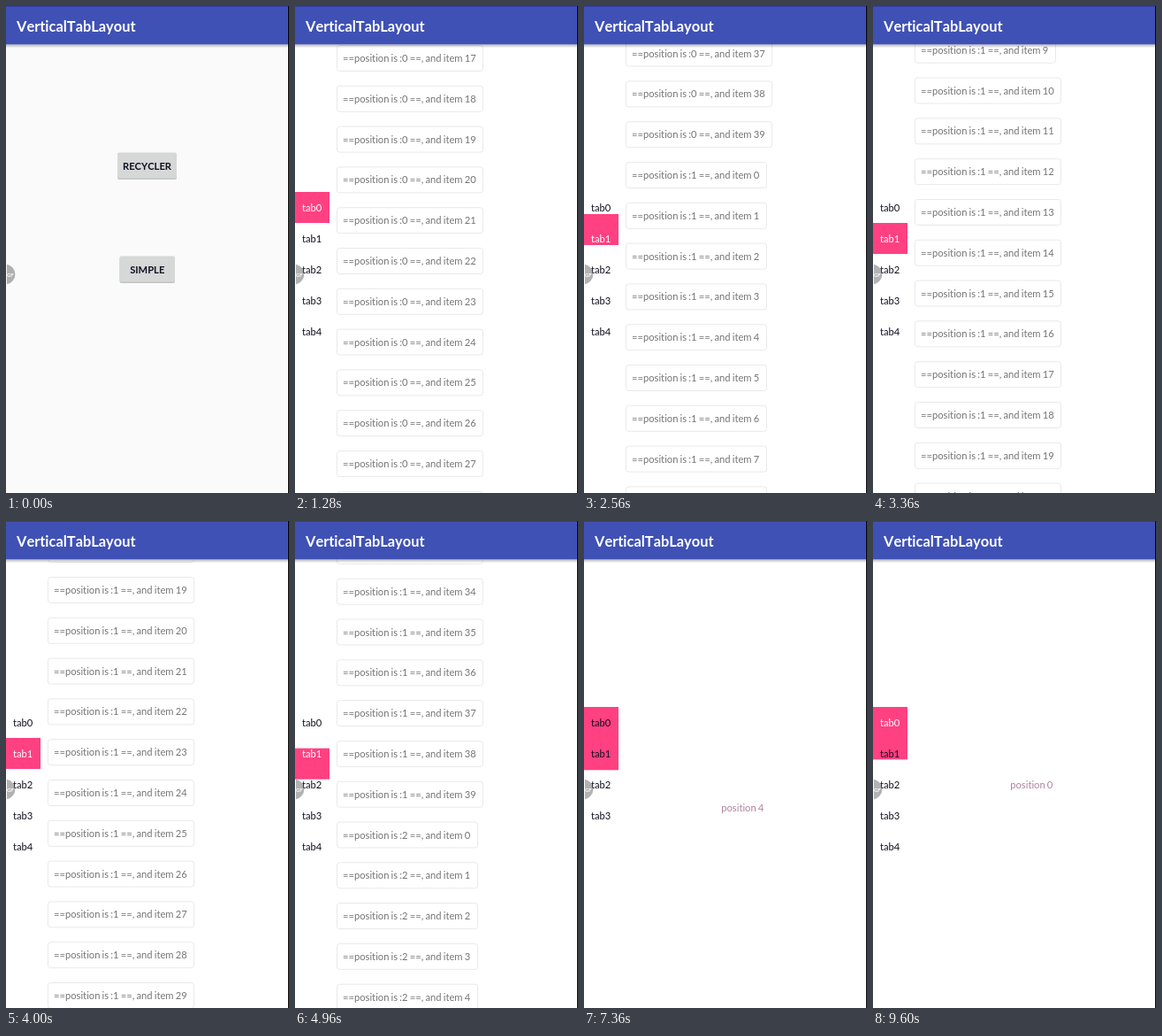
Recreate the animation shown at these times as an HTML page. Size 320 by 550 pixels, loop 9760 ms.

```html
<!DOCTYPE html>
<html lang="en">
<head>
<meta charset="utf-8">
<title>VerticalTabLayout</title>
<style>
  html, body { margin: 0; width: 100%; height: 100%; overflow: hidden; background: #fff; }
  svg { display: block; width: 100%; height: 100%; }
  text {
    font: 11.2px Lato, "Noto Sans", sans-serif;
    font-kerning: none;
    font-variant-ligatures: none;
    word-spacing: -.06em;
  }
  .title { font-size: 16.4px; font-weight: 700; fill: #fff; }
  .button { font-weight: 700; fill: #10101f; text-anchor: middle; }
  .item { fill: #757575; }
  .page { fill: #b0829a; text-anchor: middle; }
  .bubble { font-size: 6px; font-weight: 700; fill: #fff; }
</style>
</head>
<body>
<svg viewBox="0 0 320 550">
  <defs>
    <linearGradient id="shade" x2="0" y2="1">
      <stop stop-color="#000" stop-opacity=".28"/>
      <stop offset="1" stop-color="#000" stop-opacity="0"/>
    </linearGradient>
  </defs>
  <g id="stage"></g>
  <path d="M1 291.7A11.5 11.5 0 0 1 1 314.3Z" fill="#555" opacity=".45"/>
  <text class="bubble" x="1" y="305.5">GF</text>
  <rect x="319" width="1" height="550" fill="#000"/>
</svg>
<script>
const LOOP = 9760, STEP = 160;
const PITCH = 45.8, PER_TAB = 40, FIRST_Y = 69;
const TAB_TOP = 210, TAB_H = 35, HEADER_H = 43.4;
const LEAVING_SHIFT = 1.4;

// time, scroll offset, speed in px/ms
const SCROLL = [
  [560, 0, .6], [1280, 788.6, .9], [2560, 1710, .7], [4000, 2693.2, .66], [5600, 3665.4, .2]
];
// time, selected tab
const TAPS = [[6560, 0], [7326, 4], [7990, 1], [8760, 3], [9432, 0]];

const clamp = v => Math.max(0, Math.min(1, v));
const lerp = (a, b, u) => a + (b - a) * u;
const ease = u => (1 - Math.cos(Math.PI * clamp(u))) / 2;
const tabY = i => TAB_TOP + TAB_H * i;

const rect = (x, y, w, h, fill, more = '') =>
  `<rect x="${x}" y="${y}" width="${w}" height="${h}" fill="${fill}" ${more}/>`;
const label = (cls, x, y, str, more = '') =>
  `<text class="${cls}" x="${x}" y="${y}" ${more}>${str}</text>`;

function scrollAt(t) {
  if (t <= SCROLL[0][0]) return 0;
  const i = SCROLL.findIndex(k => t < k[0]);
  if (i < 0) return SCROLL[SCROLL.length - 1][1];
  const [t0, a, va] = SCROLL[i - 1], [t1, b, vb] = SCROLL[i];
  const d = t1 - t0, u = (t - t0) / d, w = 1 - u;
  return a * (1 + 2 * u) * w * w + va * d * u * w * w
       + b * u * u * (3 - 2 * u) - vb * d * u * u * w;
}

function header() {
  return rect(0, HEADER_H, 320, 4, 'url(#shade)') + rect(0, 0, 320, HEADER_H, '#3f51b5') +
    rect(0, -2, 320, 3, '#303f9f') + label('title', 12, 28.5, 'VerticalTabLayout');
}

function tabs(top, bottom, selected) {
  let out = rect(0, top, 39, bottom - top, '#ff4081');
  for (let i = 0; i < 5; i++)
    out += label('tab', 8, tabY(i) + 21.5, 'tab' + i, `fill="${i === selected ? '#fff' : '#10101f'}"`);
  return out;
}

function button(x, y, w, str, pressed) {
  return rect(x, y + 1, w, 29.5, '#000', 'rx="2" opacity=".22"') +
    rect(x, y, w, 29, pressed ? '#c2c3c3' : '#d6d7d7', 'rx="2"') +
    label('button', x + w / 2, y + 19, str);
}

function home(pressed) {
  return rect(0, 0, 320, 550, '#fafafa') + header() +
    button(126, 165.5, 67, 'RECYCLER', pressed === 'RECYCLER') +
    button(128.5, 282.5, 62.5, 'SIMPLE', pressed === 'SIMPLE');
}

function recycler(t) {
  const offset = scrollAt(t), rowY = n => FIRST_Y + n * PITCH - offset;
  const first = Math.max(0, Math.floor(offset / PITCH) - 1);
  let out = '';
  for (let n = first; n < first + 14; n++) {
    const y = rowY(n), item = n % PER_TAB;
    out += rect(47.5, y - 14.5, item > 9 ? 165 : 159, 29, '#fff', 'rx="3" stroke="#e9e9e9"') +
      label('item', 54, y + 4, `==position is :${Math.floor(n / PER_TAB)} ==, and item ${item}`);
  }
  const pos = [1, 2].reduce((sum, k) => sum + clamp((498 - rowY(k * PER_TAB)) / 430), 0);
  return out + header() + tabs(tabY(pos), tabY(pos + 1), Math.round(pos));
}

function simple(t) {
  let i = TAPS.length - 1;
  while (i > 0 && TAPS[i][0] > t) i--;
  const [start, to] = TAPS[i], from = i ? TAPS[i - 1][1] : to;
  const dir = Math.sign(to - from), dt = t - start;
  // the leading edge moves first, the trailing edge follows
  const lead = lerp(from, to, ease(dt / 100)), trail = lerp(from, to, ease(dt / 100 - 1));
  const slide = dir * 34 * (1 - clamp(dt / 160));
  return label('page', 179.3, 301.5 + slide, 'position ' + to) + header() +
    tabs(tabY(Math.min(lead, trail)), tabY(Math.max(lead, trail) + 1), to);
}

function screen(content, dy, opacity = 1) {
  return `<g transform="translate(0 ${dy})" opacity="${opacity}">` +
    rect(0, -2, 320, 560, '#fff') + content + '</g>';
}

function scene(t) {
  if (t < 320) return home();
  if (t < 480) return home('RECYCLER');
  if (t < 640) return home() + screen(recycler(0), 5, .85);
  if (t < 6080) return screen(recycler(t), t >= 5920 ? LEAVING_SHIFT : 0);
  if (t < 6560) return home();
  if (t < 6720) return home('SIMPLE');
  if (t < 6880) return home() + screen(simple(t), 5, .85);
  return screen(simple(t), 0);
}

const stage = document.getElementById('stage');
let shown = -1;
function draw() {
  const t = Math.floor(performance.now() % LOOP / STEP) * STEP;
  if (t !== shown) stage.innerHTML = scene(shown = t);
  requestAnimationFrame(draw);
}
draw();
</script>
</body>
</html>
```
